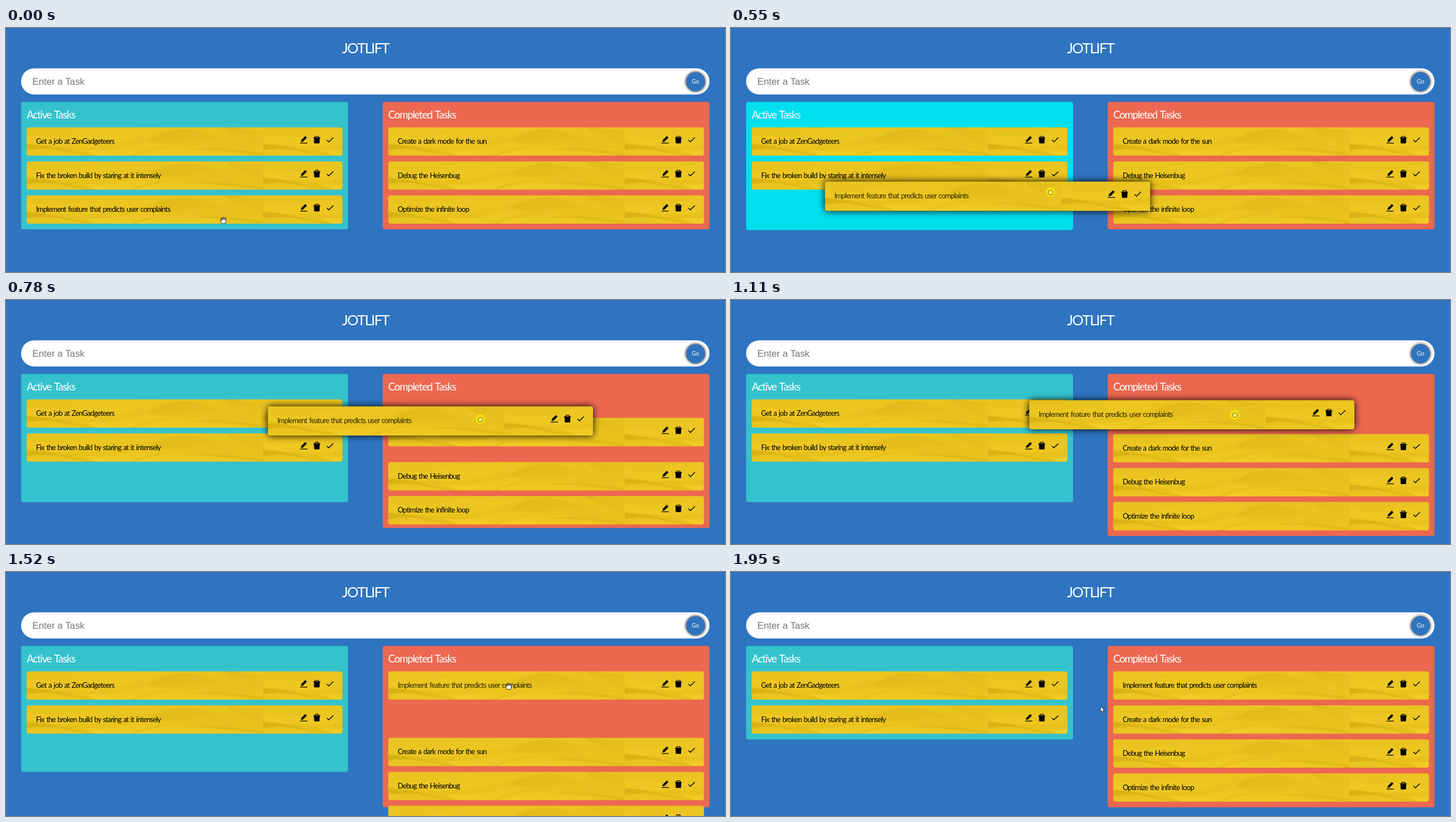
Animation, 1280 px wide and 434 px high, one loop 1990 ms. Source, as an HTML page:

```html
<!DOCTYPE html>
<html lang="en">
<head>
<meta charset="utf-8">
<title>Task board</title>
<style>
  html, body { margin: 0; width: 100%; height: 100%; overflow: hidden; background: #2f74c0; }
  svg { display: block; width: 100vw; height: 100vh; }
  .hand { font-family: Lato, "Open Sans", sans-serif; letter-spacing: -.065em; word-spacing: .09em; }
  .plain { font-family: "Liberation Sans", Arial, sans-serif; }
</style>
</head>
<body>
<svg id="stage" viewBox="0 0 1280 434" xmlns="http://www.w3.org/2000/svg">
  <defs>
    <linearGradient id="gold" x1="0" y1="0" x2="0" y2="1">
      <stop offset="0" stop-color="#e9c420"/><stop offset="1" stop-color="#e7c01b"/>
    </linearGradient>
    <linearGradient id="fold" x1="0" y1="0" x2="1" y2="1">
      <stop offset="0" stop-color="#cfa90f" stop-opacity=".75"/><stop offset="1" stop-color="#dcb716" stop-opacity=".1"/>
    </linearGradient>
    <linearGradient id="sheen" x1="0" y1="1" x2="1" y2="0">
      <stop offset="0" stop-color="#f7d22b"/><stop offset="1" stop-color="#f2cc26" stop-opacity=".15"/>
    </linearGradient>
    <pattern id="waves" width="421" height="52" patternUnits="userSpaceOnUse">
      <rect width="421" height="52" fill="url(#gold)"/>
      <path d="M0 13Q60 25 125 4L190 0H260Q170 32 100 34Q45 35 0 26Z" fill="url(#sheen)" opacity=".4"/>
      <path d="M212 26Q240 5 282 3Q318 6 362 25Q325 21 290 26Q250 32 212 26Z" fill="url(#fold)" opacity=".6"/>
      <path d="M350 0Q376 19 421 29V4Q390 6 375 0Z" fill="url(#fold)" opacity=".45"/>
      <path d="M0 30Q42 32 76 41Q112 49 150 52H0Z" fill="url(#fold)"/>
      <path d="M0 41Q32 35 62 42Q88 48 112 52H0Z" fill="#f2cc24" opacity=".6"/>
      <path d="M100 40Q155 45 200 29Q230 20 258 31Q215 36 180 52H128Z" fill="url(#sheen)" opacity=".75"/>
      <path d="M190 52Q245 31 310 36Q365 42 421 34V52Z" fill="url(#sheen)" opacity=".7"/>
      <path d="M275 40Q338 32 421 46V52Q340 38 275 40Z" fill="#d5af12" opacity=".4"/>
    </pattern>
    <!-- Icon boxes are 16.8 wide; x is measured from the card's right edge. -->
    <g id="icons">
      <path transform="translate(-77.4 13.6) scale(.0164)" d="M880 836H144q-32 0-32 32v36q0 8 8 8h784q8 0 8-8v-36q0-32-32-32zM258 752l174-30q3 0 5-3l424-424q5-7 0-14L695 115q-7-6-14 0L257 539q-2 2-3 5l-30 168q0 38 34 40z"/>
      <path transform="translate(-53.9 13.6) scale(.0164)" d="M864 256H736v-80q0-64-64-64H352q-64 0-64 64v80H160q-32 0-32 32v32q0 8 8 8h60l25 523q4 61 64 61h454q60 0 64-61l25-523h60q8 0 8-8v-32q0-32-32-32zm-200 0H360v-72h304z"/>
      <path transform="translate(-30.4 13.6) scale(.7)" d="M9 16.2 4.8 12l-1.4 1.4L9 19 21 7l-1.4-1.4z"/>
    </g>
    <filter id="buttonShadow" x="-50%" y="-50%" width="200%" height="200%"><feGaussianBlur stdDeviation="2.8"/></filter>
  </defs>
  <rect width="1280" height="434" fill="#2f74c0"/>
  <text class="hand" x="640" y="45" font-size="25.5" fill="#fff" text-anchor="middle">JOTLIFT</text>
  <rect x="26.9" y="71.8" width="1225.5" height="46.4" rx="23.2" fill="#fff"/>
  <text class="plain" x="47" y="101" font-size="16.8" fill="#757575">Enter a Task</text>
  <circle cx="1227.5" cy="95.5" r="17" filter="url(#buttonShadow)"/>
  <circle cx="1227.5" cy="95.5" r="16.8" fill="#2f74c0"/>
  <text class="plain" x="1227.5" y="99" font-size="10.1" fill="#fff" text-anchor="middle">Go</text>
  <g id="board"></g>
  <g id="cursor">
    <circle id="press" r="8.3" fill="#f4e60c" opacity=".95"/>
    <path id="open" d="M-2.5 6L-5.6 1.2Q-6.2-.3-4.7-.4L-3.2 1.2-4.2-3Q-4-4.4-2.8-3.8L-1.7-.8-1.9-4.8Q-1-6-.1-4.8L.2-1 1.1-4.8Q2.1-5.8 2.7-4.5L2.4-.6 3.7-3Q4.9-3.8 5.2-2.5L4.3 3 3 6Z" fill="#fff" stroke="#111" stroke-width=".9" stroke-linejoin="round"/>
    <path id="grab" d="M-2.4 4.5L-4.4 1Q-4.6-.6-3-.4V-2Q-2.5-3.4-1.2-2.5Q-.2-3.9.8-2.6Q2-3.4 2.7-2.1Q4.3-2.2 4.3-.4Q4.3 2.3 2.7 4.5Z" fill="#fff36a" stroke="#544d0c" stroke-width=".9"/>
    <path id="arrow" d="M0-6V4.2L2.3 2.1 4 6 5.7 5.2 4 1.5H7Z" fill="#fff" stroke="#111" stroke-width=".8"/>
  </g>
</svg>
<script>
const LOOP = 1990, GRAB = 300, LEAVE = 690, RELEASE = 1157, DROP = 1507, EXIT = 1835;
const TOP = 176.7, PITCH = 60.48, GAP = 61.7, LEFT_X = 36.9, RIGHT_X = 680.5;
const WIDTH = 562, HEIGHT = 50.4, GROW = 1.03, PANEL_TOP = 131.6;
const $ = id => document.getElementById(id);
const board = $('board');

const clamp = v => Math.max(0, Math.min(1, v));
const mix = (a, b, k) => a + (b - a) * k;
const smooth = k => (k = clamp(k), k * k * (3 - 2 * k));

function bezier(x1, y1, x2, y2) {
  const at = (a, b, s) => 3 * (1 - s) ** 2 * s * a + 3 * (1 - s) * s * s * b + s ** 3;
  return x => {
    x = clamp(x);
    let lo = 0, hi = 1;
    for (let i = 0; i < 24; i++) {
      const mid = (lo + hi) / 2;
      if (at(x1, x2, mid) < x) lo = mid; else hi = mid;
    }
    return x === 0 || x === 1 ? x : at(y1, y2, lo);
  };
}
const shift = bezier(.2, 0, 0, 1), land = bezier(.2, 1, .1, 1);

// Smooth path through [time, x, y] points, resting at turning points.
function track(keys) {
  const slope = (i, c) => (keys[i + 1][c] - keys[i][c]) / (keys[i + 1][0] - keys[i][0]);
  const tangent = (i, c) => {
    if (i === 0 || i === keys.length - 1) return 0;
    const a = slope(i - 1, c), b = slope(i, c);
    return a * b <= 0 ? 0 : 2 * a * b / (a + b);
  };
  return t => {
    let i = 0;
    while (i < keys.length - 2 && t > keys[i + 1][0]) i++;
    const d = keys[i + 1][0] - keys[i][0], k = clamp((t - keys[i][0]) / d);
    return [1, 2].map(c => mix(keys[i][c], keys[i + 1][c], smooth(k)) +
      d * k * (1 - k) * (tangent(i, c) * (1 - k) - tangent(i + 1, c) * k));
  };
}
const cursorPath = track([[40, 387, 342], [210, 391, 322], [GRAB, 391, 322], [550, 568, 292],
  [780, 844, 212], [900, 897, 204], [1200, 897, 204], [1500, 895, 203], [1640, 895, 203], [1940, 658, 245]]);
const dragPath = track([[GRAB, 28.5, 296.9], [550, 166.5, 273.5], [780, 465.5, 189.3], [915, 531, 178.2]]);

function add(parent, tag, attrs, text) {
  const el = document.createElementNS('http://www.w3.org/2000/svg', tag);
  for (const name in attrs) el.setAttribute(name, attrs[name]);
  if (text) el.textContent = text;
  parent.append(el);
  return el;
}

function panel(x, fill, title) {
  const rect = add(board, 'rect', { x, y: PANEL_TOP, width: 582, rx: 4, fill });
  add(board, 'text', { class: 'hand', x: x + 10, y: 161, 'font-size': 18.5, fill: '#fff' }, title);
  return rect;
}

function card(title) {
  const group = add(board, 'g', {});
  const shadow = add(group, 'rect', { rx: 4, opacity: 0 });
  const face = add(group, 'rect', { rx: 4, fill: 'url(#waves)' });
  const label = add(group, 'text', { class: 'hand', x: 16.7, y: 29.5, 'font-size': 13 }, title);
  const icons = add(group, 'use', { href: '#icons' });
  const item = { group, shadow, face, label, icons };
  resize(item, 1);
  return item;
}

// Widens the card itself, leaving its text and icons at their size.
function resize(item, ratio) {
  for (const rect of [item.shadow, item.face]) {
    rect.setAttribute('width', WIDTH * ratio);
    rect.setAttribute('height', HEIGHT * ratio);
  }
  item.icons.setAttribute('x', WIDTH * ratio);
}

// Puts a card's corner at x, y and magnifies it about its centre.
function place(item, x, y, scale = 1) {
  const inset = (scale - 1) / 2;
  item.group.setAttribute('transform', `translate(${x - WIDTH * inset} ${y - HEIGHT * inset}) scale(${scale})`);
}

const active = panel(26.9, '#34c3cd', 'Active Tasks');
const completed = panel(670.5, '#ec6850', 'Completed Tasks');
['Get a job at ZenGadgeteers', 'Fix the broken build by staring at it intensely'].forEach((title, i) =>
  place(card(title), LEFT_X, TOP + i * PITCH));
const done = ['Create a dark mode for the sun', 'Debug the Heisenbug', 'Optimize the infinite loop'].map(card);
const moving = card('Implement feature that predicts user complaints');

function show(id, on) { $(id).setAttribute('display', on ? 'inline' : 'none'); }

function render(t) {
  const dragging = t >= GRAB && t < DROP, dropped = t >= DROP;
  const settle = shift((t - DROP) / 200);

  active.setAttribute('fill', t >= GRAB && t < LEAVE ? '#00dfee' : '#34c3cd');
  const activeEnd = t < GRAB ? 358.1 : mix(359.4, 297.7, settle);
  const completedEnd = dropped ? 418.6 : 358.1 + GAP * shift((t - 708) / 200);
  active.setAttribute('height', activeEnd - PANEL_TOP);
  completed.setAttribute('height', completedEnd - PANEL_TOP);

  done.forEach((item, i) => {
    const offset = dropped ? PITCH + GAP * (1 - settle) : GAP * shift((t - (i ? 695 : 738)) / 200);
    place(item, RIGHT_X, TOP + i * PITCH + offset);
  });

  const hover = dropped ? smooth((t - DROP - 20) / 110) * (1 - smooth((t - EXIT) / 90)) : smooth((t - 40) / 130);
  resize(moving, dragging ? GROW : 1);
  if (dragging) {
    const [x, y] = dragPath(t), fall = land((t - RELEASE) / (DROP - RELEASE));
    place(moving, mix(x, RIGHT_X, fall), mix(y, TOP, fall));
  } else {
    place(moving, dropped ? RIGHT_X : LEFT_X, TOP + (dropped ? 0 : 2 * PITCH), mix(1, GROW, hover));
  }
  const lift = dragging ? smooth((t - GRAB) / 120) : 0;
  moving.shadow.style.filter = `blur(${mix(1.7, 6.5, lift)}px)`;
  moving.shadow.setAttribute('opacity', dragging ? mix(.8, 1, lift) : .8 * hover);
  moving.label.setAttribute('opacity', t >= GRAB && t < DROP + 40 ? .8 : 1);

  $('cursor').setAttribute('transform', `translate(${cursorPath(t)})`);
  const held = t >= GRAB && t < RELEASE;
  show('press', held);
  show('grab', held);
  show('open', !held && t < EXIT);
  show('arrow', t >= EXIT);
}

const start = performance.now();
function tick() {
  render((performance.now() - start) % LOOP);
  requestAnimationFrame(tick);
}
tick();
</script>
</body>
</html>
```
